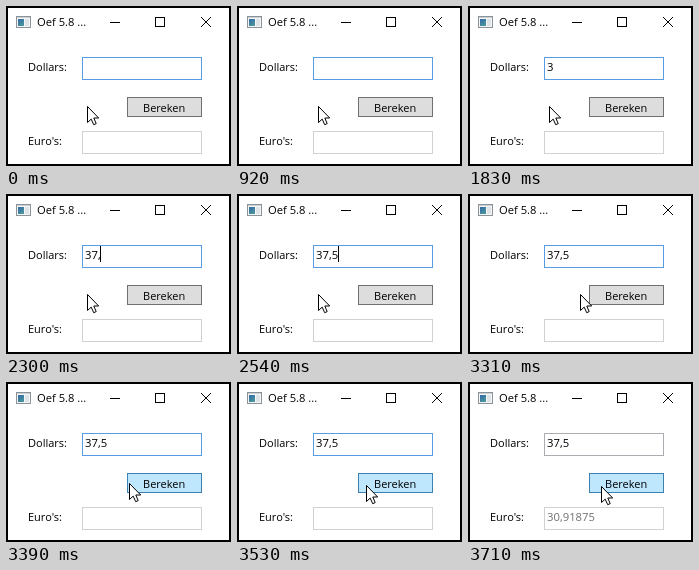
An HTML page with a canvas for the animation above (5.68 s loop, 225 px wide and 160 px high).

```html
<!DOCTYPE html>
<html lang="nl">
<head>
<meta charset="utf-8">
<title>Oef 5.8</title>
<style>
html, body { margin: 0; width: 100%; height: 100%; overflow: hidden; background: #fff; }
canvas { display: block; width: 225px; height: 160px; }
</style>
</head>
<body>
<canvas id="stage" width="225" height="160"></canvas>
<script>
const LOOP = 5680;
const FIELD_X = 79;
const ctx = document.getElementById('stage').getContext('2d');

// Each track lists [start time, value]; a value holds until the next one.
const typed = [[0, ''], [1200, '3'], [1890, '37'], [2300, '37,'], [2540, '37,5']];
const caret = [[0, false], [290, true], [920, false], [1200, true], [1830, false], [1890, true], [3230, false]];
const pointer = [
  [0, [81, 100]], [3230, [97, 100]], [3310, [112, 100]], [3390, [123, 101]],
  [3470, [129, 103]], [3550, [132, 104]], [3630, [133, 104]]
];
const button = [[0, 'normal'], [3390, 'hover'], [3630, 'pressed'], [3710, 'hover']];
const focused = [[0, true], [3630, false]];
const result = [[0, ''], [3710, '30,91875']];

const buttonColors = {
  normal: ['#dddddd', '#707070'],
  hover: ['#bee6fd', '#3c7fb1'],
  pressed: ['#c4e5f6', '#2c628b']
};

function at(track, t) {
  let value = track[0][1];
  for (const [start, v] of track) if (t >= start) value = v;
  return value;
}

function rect(x, y, w, h, color) {
  ctx.fillStyle = color;
  ctx.fillRect(x, y, w, h);
}

function box(x, y, w, h, fill, border) {
  rect(x, y, w, h, border);
  rect(x + 1, y + 1, w - 2, h - 2, fill);
}

function setFont(size) {
  ctx.font = `${size}px "Open Sans", "Noto Sans", sans-serif`;
}

function text(str, x, y, size = 11, color = '#000') {
  setFont(size);
  ctx.fillStyle = color;
  ctx.fillText(str, x, y);
}

function drawIcon() {
  box(10, 10, 15, 12, '#f4f6f7', '#8b9298');
  rect(11, 11, 13, 1, '#c9ced2');
  const shade = ctx.createLinearGradient(11, 12, 18, 21);
  shade.addColorStop(0, '#2f62a8');
  shade.addColorStop(1, '#4f9f9a');
  rect(12, 13, 6, 7, shade);
  rect(19, 13, 4, 7, '#dfe3e6');
}

function drawWindow() {
  rect(0, 0, 225, 160, '#000');
  rect(2, 2, 221, 156, '#fff');
  drawIcon();
  text('Oef 5.8 ...', 31, 20, 11.2);

  rect(104, 16, 10, 1, '#000');
  box(149, 11, 10, 10, '#fff', '#000');
  ctx.strokeStyle = '#000';
  ctx.lineWidth = 1;
  ctx.beginPath();
  ctx.moveTo(195, 11);
  ctx.lineTo(205, 21);
  ctx.moveTo(205, 11);
  ctx.lineTo(195, 21);
  ctx.stroke();

  text('Dollars:', 22, 65);
  text("Euro's:", 22, 139);
}

function drawPointer([x, y]) {
  const outline = [[0, 0], [0, 16], [3.7, 12.6], [6.2, 18.2], [8.7, 17.1], [6.3, 11.5], [11.2, 11.5]];
  ctx.beginPath();
  for (const [dx, dy] of outline) ctx.lineTo(x + dx + 0.5, y + dy + 0.5);
  ctx.closePath();
  ctx.fillStyle = '#fff';
  ctx.fill();
  ctx.strokeStyle = '#000';
  ctx.lineWidth = 1;
  ctx.stroke();
}

function draw(t) {
  drawWindow();

  const amount = at(typed, t);
  box(76, 51, 120, 23, '#fff', at(focused, t) ? '#569de5' : '#abadb3');
  text(amount, FIELD_X, 65, 11.3);
  if (at(caret, t)) {
    rect(FIELD_X + Math.floor(ctx.measureText(amount).width), 52, 1, 16, '#000');
  }

  const [fill, border] = buttonColors[at(button, t)];
  box(121, 91, 75, 20, fill, border);
  text('Bereken', 137, 106);

  box(76, 125, 120, 23, '#fff', '#d0d1d4');
  text(at(result, t), FIELD_X, 139, 11.3, '#707070');

  drawPointer(at(pointer, t));
}

const begin = performance.now();

function frame() {
  draw((performance.now() - begin) % LOOP);
  requestAnimationFrame(frame);
}
frame();
</script>
</body>
</html>
```
